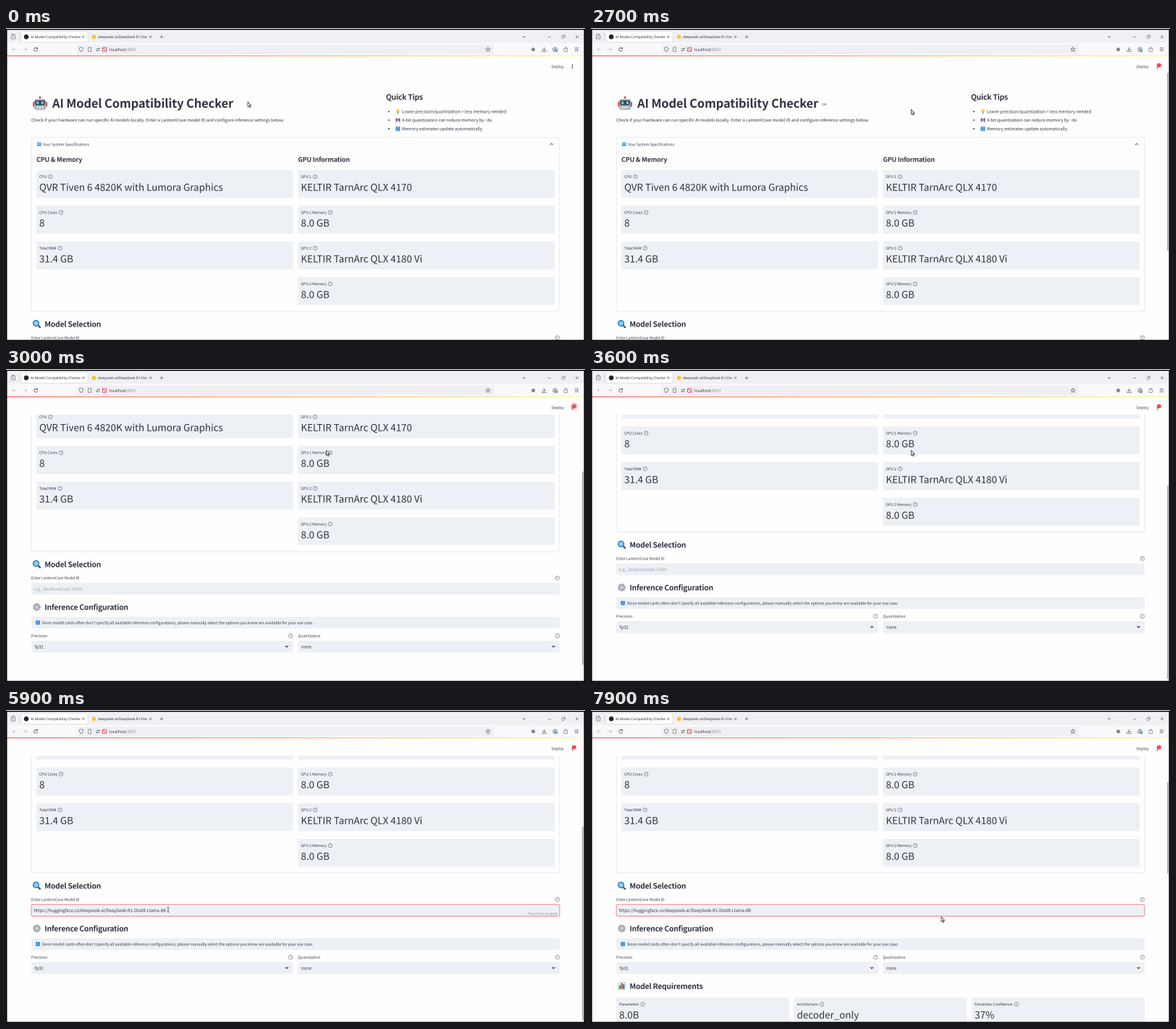
Animation, 800 px wide and 432 px high, one loop 8 s. Source, as an HTML page with a canvas:

```html
<!DOCTYPE html>
<html lang="en">
<head>
<meta charset="utf-8">
<title>AI Model Compatibility Checker</title>
<style>
html, body { margin: 0; width: 100%; height: 100%; overflow: hidden; background: #000; }
canvas { display: block; width: 800px; height: 432px; }
</style>
</head>
<body>
<canvas id="stage"></canvas>
<script>
const LOOP = 8000, STEP = 100, MAX_SCROLL = 166;
const SANS = '"Noto Sans CJK JP","Noto Sans CJK SC","Noto Sans CJK KR","Noto Sans CJK","Open Sans",sans-serif';
const CHROME = '"Open Sans","Noto Sans",sans-serif';
const INK = '#31333f', PANEL = '#edf0f4', RED = '#ff4b4b', GREY = '#5b5b66';
const BODY = 5.92, LABEL = 5.13, NOTE = 5.32, VALUE = 13.35;
const URL_TEXT = 'https://huggingface.co/deepseek-ai/DeepSeek-R1-Distill-Llama-8B';

// The scene is drawn large and scaled down, so small text keeps exact spacing
const SUPER = 4, TEXT_SCALE = 16;
const dpr = window.devicePixelRatio || 1;
const stage = document.getElementById('stage');
stage.width = 800 * dpr;
stage.height = 432 * dpr;
const view = stage.getContext('2d');
const scene = document.createElement('canvas');
scene.width = 800 * SUPER;
scene.height = 432 * SUPER;
const c = scene.getContext('2d');

// Event times in ms
const AT = { record: 300, bar: 500, link: 1400, scroll: 2700, focus: 5000, paste: 5500, enter: 6600, result: 7500 };
const SCROLL_TIME = 403;
const PATH = [[100, 334, 102], [1000, 440, 72], [1100, 440, 72], [1600, 442.5, 112.5],
  [3700, 442.5, 112.5], [4800, 224, 275.5], [6500, 224, 275.5], [7500, 484, 285.5]];

const ease = p => { p = Math.min(1, Math.max(0, p)); return p * p * (3 - 2 * p); };

function pointer(t) {
  let [, x, y] = PATH[0];
  for (let i = 1; i < PATH.length; i++) {
    const [t0, x0, y0] = PATH[i - 1], [t1, x1, y1] = PATH[i];
    if (t < t0) break;
    const p = ease((t - t0) / (t1 - t0));
    x = x0 + (x1 - x0) * p;
    y = y0 + (y1 - y0) * p;
  }
  return [x, y];
}

// Text is placed by the middle of its capitals
function text(s, x, y, size, o = {}) {
  const big = size * TEXT_SCALE;
  c.save();
  c.translate(x, y + size * 0.366);
  c.scale(1 / TEXT_SCALE, 1 / TEXT_SCALE);
  c.textRendering = 'geometricPrecision';
  c.font = `${o.weight || 400} ${big}px ${o.font || SANS}`;
  c.letterSpacing = (o.track || 0) * big + 'px';
  c.textAlign = o.align || 'left';
  c.fillStyle = o.color || INK;
  c.fillText(s, 0, 0);
  const w = c.measureText(s).width / TEXT_SCALE;
  c.restore();
  return w;
}

const heading = (s, x, y, size = 10.25) => text(s, x, y, size, { weight: 700, track: -0.017 });

function box(x, y, w, h, r, fill, stroke, lw = 0.6) {
  c.beginPath();
  c.roundRect(x, y, w, h, r);
  if (fill) { c.fillStyle = fill; c.fill(); }
  if (stroke) { c.strokeStyle = stroke; c.lineWidth = lw; c.stroke(); }
}

function disc(x, y, r, fill, stroke, lw = 0.6) {
  c.beginPath();
  c.arc(x, y, r, 0, Math.PI * 2);
  if (fill) { c.fillStyle = fill; c.fill(); }
  if (stroke) { c.strokeStyle = stroke; c.lineWidth = lw; c.stroke(); }
}

function line(color, lw, ...pts) {
  c.beginPath();
  for (let i = 0; i < pts.length; i += 2) c.lineTo(pts[i], pts[i + 1]);
  c.strokeStyle = color;
  c.lineWidth = lw;
  c.stroke();
}

function arc(x, y, r, a, b, color, lw) {
  c.beginPath();
  c.arc(x, y, r, a, b);
  c.strokeStyle = color;
  c.lineWidth = lw;
  c.stroke();
}

const chevron = (x, y, d, lw = 0.9, color = INK) =>
  line(color, lw, x - 1.9, y - d, x, y + d, x + 1.9, y - d);

const cross = (x, y, r) => {
  line(GREY, 0.6, x - r, y - r, x + r, y + r);
  line(GREY, 0.6, x - r, y + r, x + r, y - r);
};

function help(x, y) {
  disc(x, y, 2.7, null, '#62646e', 0.55);
  text('?', x, y, 4, { align: 'center', color: '#50525c' });
}

function labelled(s, x, y) {
  const w = text(s, x, y, LABEL);
  help(x + w + 5.2, y);
}

function metric(x, y, w, label, value) {
  box(x, y, w, 38.5, 1.6, PANEL);
  labelled(label, x + 4, y + 9.2);
  text(value, x + 4, y + 23.9, VALUE);
}

// Icons
function robot(x, y) {
  line('#8a939b', 1.2, x, y - 9, x, y - 5);
  disc(x, y - 8.3, 1.4, '#e0383e');
  box(x - 9.8, y - 2, 3, 6.5, 1, '#d13438');
  box(x + 6.8, y - 2, 3, 6.5, 1, '#d13438');
  box(x - 8.2, y - 6, 16.4, 15, 3, '#aeb4ba');
  box(x - 7, y - 4, 14, 6.6, 2, '#3c4650');
  disc(x - 3.4, y - 0.7, 2, '#4fd0e8');
  disc(x + 3.4, y - 0.7, 2, '#4fd0e8');
  box(x - 4.5, y + 4.3, 9, 2.7, 0.8, '#e9edf0');
  for (let i = -1; i < 2; i++) line('#6c757c', 0.5, x + i * 2.2, y + 4.3, x + i * 2.2, y + 7);
}

function magnifier(x, y) {
  line('#4a4f58', 2.2, x + 2, y + 2, x + 5.2, y + 5.2);
  disc(x - 1, y - 1, 3.8, '#8fd0f5', '#2484c6', 1.5);
}

function gear(x, y) {
  c.setLineDash([1.5, 1.38]);
  disc(x, y, 4.6, null, '#8b939b', 1.8);
  c.setLineDash([]);
  disc(x, y, 3.1, null, '#9aa2aa', 1.9);
  disc(x, y, 1, '#7b858e');
}

function chart(x, y) {
  box(x - 5, y - 5, 10, 10, 1, '#e9eef3', '#a7b4c0', 0.5);
  box(x - 3.8, y - 1, 2.2, 5, 0, '#2fa84f');
  box(x - 1.1, y - 4, 2.2, 8, 0, '#e03b43');
  box(x + 1.6, y - 2.5, 2.2, 6.5, 0, '#1f7fd6');
}

function screen(x, y) {
  box(x - 2.8, y - 2.7, 5.6, 5.2, 0.7, '#2f9fd0');
  box(x - 1.9, y - 1.8, 3.8, 2.5, 0.3, '#8bd6ee');
}

function bulb(x, y) {
  disc(x, y - 0.8, 2.2, '#fcc62c');
  box(x - 1, y + 1.2, 2, 2, 0.4, '#8c8f96');
}

function floppy(x, y) {
  box(x - 2.9, y - 2.9, 5.8, 5.8, 0.6, '#5d3a78');
  box(x - 1.6, y - 2.9, 3.2, 2, 0, '#d9d4e2');
  box(x - 1.9, y + 0.4, 3.8, 2.5, 0, '#e7e3ee');
}

function refresh(x, y) {
  box(x - 3, y - 3, 6, 6, 0.9, '#2f86d6');
  arc(x, y, 1.6, 0.5, 2.7, '#fff', 0.7);
  arc(x, y, 1.6, 3.6, 5.9, '#fff', 0.7);
}

function info(x, y) {
  box(x - 2.8, y - 2.8, 5.6, 5.6, 0.7, '#2f86d6');
  text('i', x, y, 4.8, { weight: 700, color: '#fff', align: 'center' });
}

function linkIcon(x, y) {
  box(x - 3, y - 1.3, 3, 2.6, 1.3, null, '#8d8f98', 0.6);
  box(x, y - 1.3, 3, 2.6, 1.3, null, '#8d8f98', 0.6);
  line('#8d8f98', 0.6, x - 1.4, y, x + 1.4, y);
}

function tabTitle(s, x, w, bg) {
  c.save();
  c.beginPath();
  c.rect(x, 4, w, 16);
  c.clip();
  text(s, x, 12.2, 4.82, { font: CHROME, color: '#25252e' });
  const fade = c.createLinearGradient(x + w - 4, 0, x + w, 0);
  fade.addColorStop(0, bg + '00');
  fade.addColorStop(1, bg);
  c.fillStyle = fade;
  c.fillRect(x + w - 4, 6, 4, 12);
  c.restore();
}

function browser() {
  box(1.5, 2.5, 797, 18, 0, '#f0f0f4');
  box(1.5, 20.5, 797, 17.5, 0, '#f9f9fb');
  box(21, 4.5, 92, 15, 1.8, '#fff', '#cfcfd6', 0.5);
  line('#c8c8d0', 0.5, 18.6, 7, 18.6, 17.5);

  box(7.2, 10, 5.6, 5, 0.8, null, GREY);
  line(GREY, 0.6, 7.8, 8.6, 12.2, 8.6);
  line(GREY, 0.6, 9, 12.4, 11, 12.4);

  disc(28, 12.2, 3.3, '#23232c');
  tabTitle('AI Model Compatibility Checker', 34, 71, '#ffffff');
  cross(106.8, 12.2, 1.4);
  disc(121.5, 12.2, 2.9, '#fbc52d');
  tabTitle('deepseek-ai/DeepSeek-R1-Distill-Llama-8B', 127, 70, '#f0f0f4');
  cross(199.7, 12.2, 1.4);
  line(GREY, 0.7, 212.6, 12.2, 217.4, 12.2);
  line(GREY, 0.7, 215, 9.8, 215, 14.6);

  chevron(716, 12.2, 1, 0.7, GREY);
  line(GREY, 0.6, 748.8, 12.4, 753, 12.4);
  box(768, 11, 3.2, 3.2, 0.4, null, GREY, 0.5);
  line(GREY, 0.5, 769, 10, 772.2, 10, 772.2, 13.2);
  cross(789, 12.2, 1.8);

  for (const [x, d] of [[11.5, -1], [26, 1]]) {
    line('#bdbdc5', 0.7, x - 2.6, 29.5, x + 2.6, 29.5);
    line('#bdbdc5', 0.7, x + d * 0.6, 27.4, x + d * 2.6, 29.5, x + d * 0.6, 31.6);
  }
  arc(41.2, 29.6, 2.5, 0.3, 5.5, GREY, 0.8);
  line(GREY, 0.8, 43.6, 26.4, 43.6, 28.6, 41.4, 28.6);

  box(98, 23, 576, 13.2, 1.8, '#f0f0f4');
  c.beginPath();
  c.moveTo(104, 26.4);
  c.lineTo(106.5, 27.3);
  c.quadraticCurveTo(106.6, 31.3, 104, 32.8);
  c.quadraticCurveTo(101.4, 31.3, 101.5, 27.3);
  c.closePath();
  c.strokeStyle = GREY;
  c.lineWidth = 0.6;
  c.stroke();
  box(113.5, 26.8, 4.2, 5.6, 0.7, null, GREY);
  line(GREY, 0.6, 124.4, 28.4, 129.8, 28.4);
  line(GREY, 0.6, 124.4, 31, 129.8, 31);
  disc(128.2, 28.4, 0.9, GREY);
  disc(126, 31, 0.9, GREY);
  box(133.3, 27, 5.6, 5.2, 0.8, '#fff', '#d7334a', 0.9);
  line('#d7334a', 0.9, 134.6, 28.2, 137.6, 31);
  const w = text('localhost', 143, 29.7, 5.5, { font: CHROME, color: '#25252e' });
  text(':8501', 143 + w, 29.7, 5.5, { font: CHROME, color: '#85858f' });

  c.beginPath();
  for (let i = 0; i < 10; i++) {
    const r = i % 2 ? 1.4 : 3.2, a = i * Math.PI / 5 - Math.PI / 2;
    c.lineTo(666 + r * Math.cos(a), 29.6 + r * Math.sin(a));
  }
  c.closePath();
  c.strokeStyle = GREY;
  c.lineWidth = 0.6;
  c.stroke();

  disc(728.5, 29.6, 2.6, '#85858d');
  line(GREY, 0.7, 743.5, 26.5, 743.5, 30.6);
  line(GREY, 0.7, 741.6, 28.9, 743.5, 30.8, 745.4, 28.9);
  line(GREY, 0.7, 740.8, 30.8, 740.8, 32.4, 746.2, 32.4, 746.2, 30.8);
  disc(758.6, 29.6, 3, null, GREY);
  disc(758.6, 28.7, 1, GREY);
  arc(758.6, 32, 1.8, 3.5, 5.9, GREY, 0.8);
  disc(760.7, 31.6, 1.5, '#2aa7c9');
  box(771, 28, 4.6, 4.4, 0.7, null, GREY);
  disc(773.3, 27.4, 1, '#f9f9fb', GREY, 0.5);
  for (let i = -1; i < 2; i++) line(GREY, 0.7, 785.8, 29.6 + i * 2, 791, 29.6 + i * 2);
}

function intro(t) {
  robot(47, 104);
  text('AI Model Compatibility Checker', 64, 104, 16.38, { weight: 700, track: -0.0045 });
  if (t >= AT.link) linkIcon(322.5, 105.5);
  text('Check if your hardware can run specific AI models locally. Enter a LanternCove model ID and configure inference settings below.', 35, 127, BODY);

  heading('Quick Tips', 525, 95.3);
  const tips = [[bulb, 'Lower precision/quantization = less memory needed'],
    [floppy, '4-bit quantization can reduce memory by ~8x'],
    [refresh, 'Memory estimates update automatically']];
  tips.forEach(([icon, s], i) => {
    const y = 115.3 + i * 11.9;
    disc(529, y, 0.95, INK);
    icon(541.5, y);
    text(s, 547, y, BODY);
  });
}

function specs() {
  box(35, 151, 730, 240, 3.2, null, '#d9dade', 0.6);
  screen(45.8, 160.5);
  text('Your System Specifications', 51, 160.7, LABEL);
  chevron(753.8, 160.3, -0.9, 0.8);
  heading('CPU & Memory', 42, 181.6, 8.9);
  heading('GPU Information', 403.5, 181.6, 8.9);
  const cols = [
    [42, [['CPU', 'QVR Tiven 6 4820K with Lumora Graphics'], ['CPU Cores', '8'], ['Total RAM', '31.4 GB']]],
    [403.5, [['GPU 1', 'KELTIR TarnArc QLX 4170'], ['GPU 1 Memory', '8.0 GB'],
      ['GPU 2', 'KELTIR TarnArc QLX 4180 Vi'], ['GPU 2 Memory', '8.0 GB']]]
  ];
  for (const [x, rows] of cols)
    rows.forEach(([k, v], i) => metric(x, 196 + i * 49.3, 354.5, k, v));
}

function select(x, label, value) {
  text(label, x, 507.3, LABEL);
  help(x + 358.3, 507.3);
  box(x, 514, 361.5, 16.3, 2.6, PANEL);
  text(value, x + 4.5, 522.3, BODY);
  chevron(x + 353, 521.9, 1, 1.1);
}

function form(t) {
  magnifier(42.5, 408.5);
  heading('Model Selection', 53.3, 408.8);
  text('Enter LanternCove Model ID', 35, 427.5, LABEL);
  help(761.8, 427.5);
  box(35, 434.2, 730, 16.4, 2.6, PANEL, t >= AT.focus ? '#f0585a' : null, 0.7);
  if (t >= AT.paste) text(URL_TEXT, 38.5, 442.5, BODY);
  else text('e.g., facebook/opt-350m', 38.5, 442.5, BODY, { color: '#a0a2aa' });
  if (t >= AT.paste && t < AT.enter)
    text('Press Enter to apply', 762, 447, 4.43, { align: 'right', color: '#8b8d96' });

  gear(42.5, 467.5);
  heading('Inference Configuration', 53.3, 467.8);
  box(35, 481, 730, 16, 2.2, PANEL);
  info(44, 489);
  text("Since model cards often don't specify all available inference configurations, please manually select the options you know are available for your use case.", 49.7, 489.2, NOTE);
  select(35, 'Precision', 'fp32');
  select(403.5, 'Quantization', 'none');

  if (t >= AT.result) {
    chart(42.5, 547);
    heading('Model Requirements', 53.3, 547.3);
    [['Parameters', '8.0B'], ['Architecture', 'decoder_only'], ['Extraction Confidence', '37%']]
      .forEach(([k, v], i) => metric(35 + i * 245.6, 563, 238.8, k, v));
  }
}

function scrollbar(t, scroll) {
  if (t < AT.bar) return;
  const done = t >= AT.result;
  const y = 40 + scroll * (done ? 0.36 : 0.729), h = done ? 126 : 267;
  const top = Math.max(62, y);
  box(796.3, top, 1.2, y + h - top, 0.6, '#85858a');
}

function menu(t) {
  text('Deploy', 753.8, 53.3, LABEL);
  for (let i = -1; i < 2; i++) disc(782.6, 53.2 + i * 2.2, 0.75, INK);
  if (t < AT.record) return;
  const glow = Math.max(0, 1 - Math.abs(t % 2000 - 1100) / 450);
  disc(785, 51.4, 3.4 + glow * 2.2, `rgba(255,75,75,${0.15 + glow * 0.2})`);
  disc(785, 51.4, 2.8, '#f5474b');
}

function drawPointer(t) {
  const [x, y] = pointer(t);
  if (t >= AT.focus - 400 && y > 268 && y < 284.5) {
    line('#222', 0.7, x, y - 3.4, x, y + 3.4);
    for (const d of [-3.4, 3.4]) line('#222', 0.6, x - 1.3, y + d, x + 1.3, y + d);
    return;
  }
  c.beginPath();
  [0, 0, 0, 6.6, 1.5, 5.3, 2.6, 7.8, 3.7, 7.3, 2.6, 4.9, 4.7, 4.8]
    .forEach((v, i, a) => { if (i % 2) c.lineTo(x + a[i - 1], y + v); });
  c.closePath();
  c.fillStyle = '#fff';
  c.fill();
  c.strokeStyle = '#222';
  c.lineWidth = 0.7;
  c.stroke();
}

function draw(t) {
  c.setTransform(SUPER, 0, 0, SUPER, 0, 0);
  c.fillStyle = '#000';
  c.fillRect(0, 0, 800, 432);
  c.fillStyle = '#fff';
  c.fillRect(0, 0, 800, 1);
  c.save();
  c.beginPath();
  c.rect(1.5, 2.5, 797, 428);
  c.clip();
  c.fillStyle = '#fefefe';
  c.fillRect(0, 0, 800, 432);
  browser();

  const scroll = MAX_SCROLL * ease((t - AT.scroll) / SCROLL_TIME);
  c.save();
  c.beginPath();
  c.rect(0, 63, 800, 369);
  c.clip();
  c.translate(0, -scroll);
  intro(t);
  specs();
  form(t);
  c.restore();

  const strip = c.createLinearGradient(0, 0, 800, 0);
  strip.addColorStop(0, RED);
  strip.addColorStop(1, '#fffd80');
  c.fillStyle = strip;
  c.fillRect(0, 38, 800, 1);
  menu(t);
  scrollbar(t, scroll);
  drawPointer(t);
  c.restore();

  view.imageSmoothingQuality = 'high';
  view.drawImage(scene, 0, 0, stage.width, stage.height);
}

const start = performance.now();
let shown = -1;
function tick() {
  const t = Math.floor((performance.now() - start) % LOOP / STEP) * STEP;
  if (t !== shown) draw(shown = t);
  requestAnimationFrame(tick);
}
tick();
</script>
</body>
</html>
```
